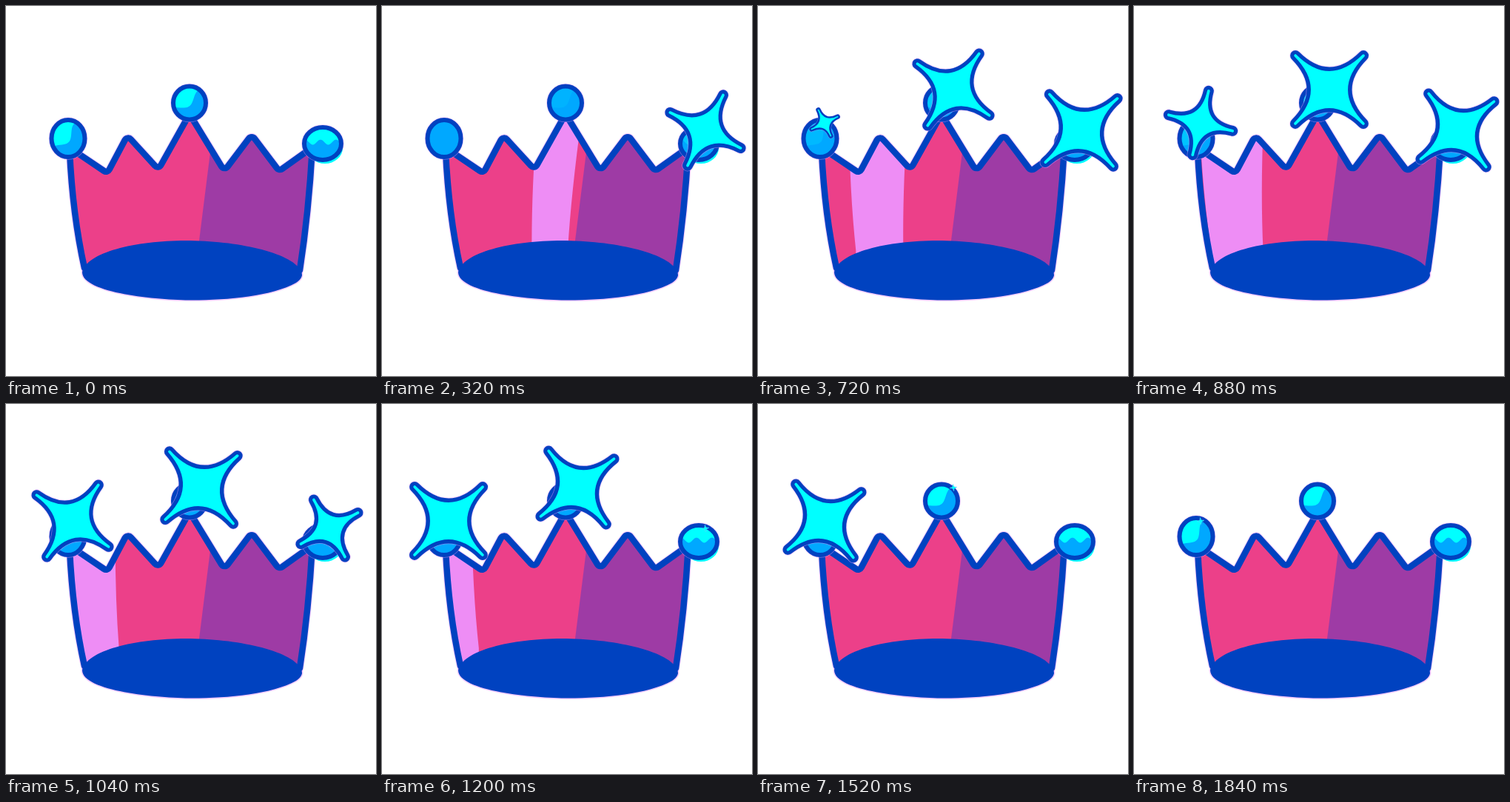
Write an HTML page with a canvas that moves like this. It is 500x500 px and loops after 1920 ms.

```html
<!DOCTYPE html>
<html lang="en">
<head>
<meta charset="utf-8">
<title>Sparkling crown</title>
<style>
html, body { margin: 0; width: 100%; height: 100%; overflow: hidden; background: #fff; }
canvas { display: block; width: 500px; height: 500px; }
</style>
</head>
<body>
<canvas id="stage" width="500" height="500"></canvas>
<script>
const ctx = document.getElementById('stage').getContext('2d');
const STEP = 80, COUNT = 24;
const LINE = '#0042c0', PINK = '#ec4089', PURPLE = '#9e3ba5', SHINE = '#ee8df5';
const BLUE = '#00a8ff', CYAN = '#00ffff', HALO = 'rgba(238,150,250,.5)';

// Each jewel has a wavy highlight and a star that appears after a delay
const jewels = [
  { x: 428, y: 186, rx: 25, ry: 22, tilt: 0, amp: -3.5, freq: 0.3, star: { x: 437, y: 168 }, delay: 0 },
  { x: 248, y: 131, rx: 22, ry: 22.5, tilt: -0.6, amp: 5.5, freq: 0.14, star: { x: 264, y: 113 }, delay: 4 },
  { x: 84, y: 179, rx: 22.5, ry: 25, tilt: -0.8, amp: 6, freq: 0.14, star: { x: 90, y: 158 }, delay: 8 }
];

const zigzag = [[137, 226], [164, 175], [206, 221], [248, 146], [295, 223], [332, 174], [369, 223], [414, 191]];

function outline() {
  const p = new Path2D();
  p.moveTo(106, 354);
  p.quadraticCurveTo(90, 282, 86, 196);
  p.lineTo(97, 199);
  for (let i = 0; i < zigzag.length - 1; i++) p.arcTo(...zigzag[i], ...zigzag[i + 1], 5);
  p.lineTo(414, 191);
  p.quadraticCurveTo(409, 280, 397, 357);
  return p;
}

function oval(x, y, rx, ry) {
  const p = new Path2D();
  p.ellipse(x, y, rx, ry, 0, 0, Math.PI * 2);
  return p;
}

function fill(path, color) {
  ctx.fillStyle = color;
  ctx.fill(path);
}

function stroke(path, color, width) {
  ctx.strokeStyle = color;
  ctx.lineWidth = width;
  ctx.stroke(path);
}

const clamp = v => Math.max(0, Math.min(1, v));

const crown = outline();
const base = new Path2D('M103 360C108 333 175 317 243 317S385 333 398 357Q404 366 392 374C360 392 300 397.5 252 397.5S104 388 103 360Z');
const pinkSide = new Path2D('M60 140H284L276 198L260 325V400H60Z');

// Band edges lean with the curve of the crown
function bandEdge(x) {
  const tilt = (172 - x) * 0.16;
  return { top: x - tilt * 0.25, mid: x + tilt * 0.4 - 4, low: x + tilt };
}

function drawBand(frame) {
  const a = bandEdge(275 - 16.7 * frame);
  const b = bandEdge(318 - 13 * frame);
  const p = new Path2D();
  p.moveTo(a.top, 150);
  p.quadraticCurveTo(a.mid, 250, a.low, 330);
  p.lineTo(a.low, 370);
  p.lineTo(b.low, 370);
  p.lineTo(b.low, 330);
  p.quadraticCurveTo(b.mid, 250, b.top, 150);
  fill(p, SHINE);
}

function drawCrown(frame) {
  stroke(crown, HALO, 10.5);
  stroke(base, HALO, 3);
  ctx.save();
  ctx.clip(crown);
  ctx.fillStyle = PURPLE;
  ctx.fillRect(60, 130, 380, 260);
  ctx.clip(pinkSide);
  ctx.fillStyle = PINK;
  ctx.fillRect(60, 130, 380, 260);
  if (frame > 0 && frame < 19) drawBand(frame);
  ctx.restore();
  stroke(crown, LINE, 8.5);
  fill(base, LINE);
}

function drawJewel(j, frame) {
  const glow = Math.max(1 - frame / 4, clamp((frame - j.delay + 2) / 16));
  const ball = oval(j.x, j.y, j.rx, j.ry);
  stroke(ball, HALO, 7.5);
  if (j.delay === 0) fill(oval(431, 192, 24, 21), CYAN);
  fill(ball, BLUE);
  ctx.save();
  ctx.clip(ball);
  ctx.globalAlpha = glow;
  ctx.translate(j.x, j.y);
  ctx.rotate(j.tilt);
  const p = new Path2D();
  p.moveTo(-30, -30);
  for (let x = -30; x <= 30; x += 2) p.lineTo(x, j.amp * Math.cos((x + 3) * j.freq) - 2);
  p.lineTo(30, -30);
  fill(p, CYAN);
  ctx.restore();
  stroke(ball, LINE, 6);
}

// Swells quickly, holds, then shrinks to a glint
function starSize(life) {
  const t = clamp(Math.min(life / 7, (15.1 - life) / 5));
  return 65 * Math.sin(t * Math.PI / 2) ** 0.8;
}

// Spins fast at both ends of its life and drifts in between
function starTurn(life) {
  const t = life - 9;
  return (-41.5 + 1.2 * t + 0.126 * t ** 3) * Math.PI / 180;
}

function drawStar({ x, y }, life) {
  const r = starSize(life), turn = starTurn(life);
  if (r <= 0) return;
  const tip = Math.min(4.4, r * 0.1), width = Math.min(5.2, r * 0.13), waist = r * 0.1;
  const p = new Path2D();
  for (let i = 0; i <= 4; i++) {
    const a = turn + i * Math.PI / 2, b = a - Math.PI / 4;
    const cx = r * Math.cos(a), cy = r * Math.sin(a);
    const sx = cx + tip * Math.sin(a), sy = cy - tip * Math.cos(a);
    if (i) p.quadraticCurveTo(waist * Math.cos(b), waist * Math.sin(b), sx, sy);
    if (i < 4) p.arc(cx, cy, tip, a - Math.PI / 2, a + Math.PI / 2);
  }
  p.closePath();
  ctx.save();
  ctx.translate(x, y);
  stroke(p, HALO, width * 1.3);
  fill(p, CYAN);
  if (r > 8) stroke(p, LINE, width);
  ctx.restore();
}

function draw(frame) {
  ctx.fillStyle = '#fff';
  ctx.fillRect(0, 0, 500, 500);
  ctx.lineJoin = ctx.lineCap = 'round';
  drawCrown(frame);
  jewels.forEach(j => drawJewel(j, frame));
  jewels.forEach(j => drawStar(j.star, frame - j.delay));
}

const start = performance.now();
function tick() {
  const time = Math.max(0, performance.now() - start);
  draw(Math.floor(time / STEP) % COUNT);
  requestAnimationFrame(tick);
}
tick();
</script>
</body>
</html>
```
